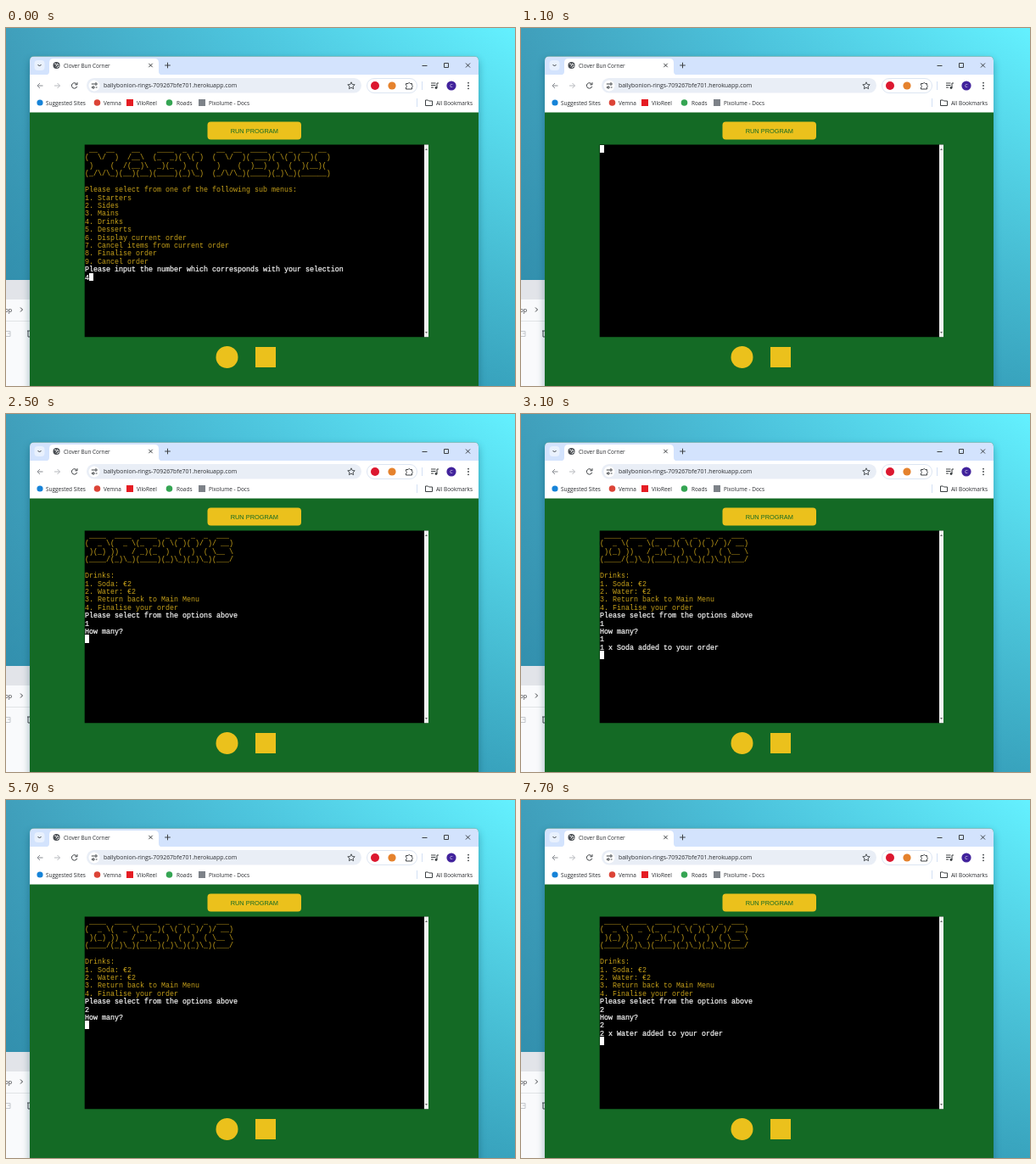
An HTML page for the animation above (8000 ms loop, 600 px wide and 422 px high).

```html
<!DOCTYPE html>
<html lang="en">
<head>
<meta charset="utf-8">
<title>Terminal order</title>
<style>
html, body { margin: 0; width: 100%; height: 100%; overflow: hidden; }
#stage { position: relative; width: 600px; height: 422px; overflow: hidden; background: #3fa9c8; }
svg { position: absolute; inset: 0; }
svg text { font-family: "Open Sans", "Noto Sans", sans-serif; fill: #2a2c30; }
.marks text { font-size: 6.45px; }
.line { fill: none; stroke: #3c4043; stroke-width: 1; }
#term {
  position: absolute; left: 93px; top: 138px; width: 400px; height: 226px; margin: 0;
  box-sizing: border-box; padding-top: 2px; overflow: hidden; background: #000; color: #c8a21a;
  font: 8.333px/9.42px "Liberation Mono", monospace; white-space: pre;
}
#term b { color: #fff; font-weight: normal; -webkit-text-stroke: .2px #fff; }
#term i {
  display: inline-block; position: relative; top: -2px; width: 5px; height: 9.42px;
  background: #fff; vertical-align: top;
}
</style>
</head>
<body>
<div id="stage">
<svg width="600" height="422" viewBox="0 0 600 422">
  <defs>
    <linearGradient id="sky">
      <stop offset="0" stop-color="#409fbb"/>
      <stop offset=".45" stop-color="#4dc4dd"/>
      <stop offset="1" stop-color="#64f1ff"/>
    </linearGradient>
    <linearGradient id="shade" x2="0" y2="1">
      <stop offset="0" stop-color="#247f9f" stop-opacity="0"/>
      <stop offset="1" stop-color="#247f9f" stop-opacity=".68"/>
    </linearGradient>
    <filter id="soft" x="-10%" y="-10%" width="120%" height="120%"><feGaussianBlur stdDeviation="5"/></filter>
  </defs>
  <rect width="600" height="422" fill="url(#sky)"/>
  <rect width="600" height="422" fill="url(#shade)"/>

  <!-- window behind -->
  <path d="M0 297H40V422H0z" fill="#f9fafc"/>
  <path d="M0 297H40V320H0z" fill="#e2e4e9"/>
  <path d="M0 345.5H40" stroke="#e1e3e6"/>
  <text x="-1.5" y="334.5" font-size="7">op</text>
  <path class="line" d="M17 329.5l2.5 2.5-2.5 2.5"/>
  <path class="line" d="M-1 357.5H5V363.5H-1M2 360H5" style="stroke:#c3c7cc"/>
  <path class="line" d="M25 357H31M26 357V364H31"/>

  <!-- browser frame -->
  <rect x="28" y="37" width="529" height="400" rx="5" fill="#003a50" opacity=".38" filter="url(#soft)"/>
  <path d="M28 422V38.5q0-5 5-5H552q5 0 5 5V422z" fill="#146a25"/>
  <path d="M28 56V38.5q0-5 5-5H552q5 0 5 5V56z" fill="#d3e3fd"/>
  <path d="M28 55H557V99.5H28z" fill="#fff"/>
  <path d="M47 55.2q4 0 4-4V41q0-5 5-5H175q5 0 5 5V51.2q0 4 4 4z" fill="#fff"/>
  <rect x="33.5" y="38" width="12" height="12" rx="4" fill="#e9f1fe"/>
  <path class="line" d="M37.5 43l2 2 2-2"/>
  <circle cx="59.5" cy="44" r="4" fill="#474b50"/>
  <path d="M57 42l2 .5 1 1.5-1.5 1M61 41.5l-.5 1.5 2 1M60 47l1-1.5 1.5 0" fill="none" stroke="#fff" stroke-width=".9"/>
  <text x="68" y="46.5" font-size="6.4">Clover Bun Corner</text>
  <path class="line" d="M168.3 41.8l4.4 4.4m0-4.4l-4.4 4.4M187.2 44H193.8M190.5 40.7V47.3"/>
  <path class="line" d="M490.5 44.5H496.5M516.5 41.5H521.5V46.5H516.5zM542 41.5l5 5m0-5l-5 5"/>

  <!-- toolbar -->
  <path class="line" d="M43.5 68H37M40 65l-3 3 3 3" style="stroke:#888c91"/>
  <path class="line" d="M57 68H63.5M60.5 65l3 3-3 3" style="stroke:#b6b9bd"/>
  <path class="line" d="M83.3 66.2a3.2 3.2 0 1 0 .4 2.6M84 64.2V66.8H81.4"/>
  <rect x="95" y="59" width="324" height="17.5" rx="8.7" fill="#e9eef6"/>
  <circle cx="104" cy="68" r="6.5" fill="#fff"/>
  <path class="line" d="M100.8 66H104M105.8 70H107.5M100.8 70H102.2"/>
  <circle class="line" cx="106" cy="66" r="1.2"/>
  <circle class="line" cx="103" cy="70" r="1.2"/>
  <text x="115" y="70.4" font-size="6.93">ballybonion-rings-709267bfe701.herokuapp.com</text>
  <path class="line" d="M407 63.8l1.2 2.7 3 .3-2.2 2 .6 2.9-2.6-1.5-2.6 1.5.6-2.9-2.2-2 3-.3z" style="stroke-width:.9"/>
  <rect x="425.5" y="59.5" width="59" height="17" rx="8.5" fill="#fff" stroke="#dce5f2"/>
  <circle cx="435" cy="68" r="5" fill="#dc1830"/>
  <circle cx="455" cy="68" r="4.6" fill="#e5822d"/>
  <path class="line" d="M471.5 65.5H474a1.4 1.4 0 0 1 2.6 0H478.5V67.5a1.3 1.3 0 0 1 0 2.4V72H471.5V70a1.4 1.4 0 0 0 0-2.6z"/>
  <path d="M490.5 63V73" stroke="#d3e0f4"/>
  <path class="line" d="M501 65H506.5M501 67.5H506.5M501 70H504M508 70.5V65H510"/>
  <circle cx="507" cy="70.5" r="1.4" fill="#3c4043"/>
  <circle cx="525" cy="68" r="5.6" fill="#42239c"/>
  <text x="525" y="70" font-size="5.5" text-anchor="middle" style="fill:#fff">C</text>
  <g fill="#3c4043"><circle cx="545" cy="64.7" r=".9"/><circle cx="545" cy="68" r=".9"/><circle cx="545" cy="71.3" r=".9"/></g>

  <!-- bookmarks -->
  <g class="marks">
    <circle cx="40" cy="88" r="3.6" fill="#1683d8"/><text x="47" y="90.5">Suggested Sites</text>
    <circle cx="107.5" cy="88" r="3.8" fill="#dc4437"/><text x="115" y="90.5">Vemna</text>
    <rect x="142" y="84" width="8" height="8" fill="#e51c23"/><text x="154" y="90.5">ViloReel</text>
    <circle cx="192.5" cy="88" r="3.8" fill="#35a553"/><text x="201" y="90.5">Roads</text>
    <rect x="227" y="84" width="8" height="8" fill="#7d8288"/><text x="239" y="90.5">Pixolume - Docs</text>
    <path d="M484.5 83V93" stroke="#d3e0f4"/>
    <path class="line" d="M494.5 85H497.5L498.5 86H502.5V91.5H494.5z"/><text x="507" y="90.5">All Bookmarks</text>
  </g>

  <!-- page -->
  <rect x="237.5" y="110.5" width="110.5" height="21" rx="4" fill="#ebc11c"/>
  <text x="292.8" y="124" font-size="7.4" text-anchor="middle" style="font-family:'Liberation Sans',sans-serif;fill:#146a25">RUN PROGRAM</text>
  <path d="M92.7 137.6H498V364.2H92.7z"/>
  <path d="M493 137.6H498V364.2H493z" fill="#f1f1f1"/>
  <path d="M494 144l1.5-2 1.5 2zM494 358l1.5 2 1.5-2z" fill="#666"/>
  <circle cx="260.5" cy="388" r="13" fill="#ebc11c"/>
  <rect x="294" y="376" width="24" height="24" fill="#ebc11c"/>
</svg>
<pre id="term"></pre>
</div>
<script>
const LOOP = 8000;
const CURSOR = '<i></i>';
const white = s => `<b>${s}</b>`;

const mainMenu = String.raw` __  __    __    ____  _  _    __  __  ____  _  _  __  __
(  \/  )  /__\  (_  _)( \( )  (  \/  )( ___)( \( )(  )(  )
 )    (  /(__)\  _)(_  )  (    )    (  )__)  )  (  )(__)(
(_/\/\_)(__)(__)(____)(_)\_)  (_/\/\_)(____)(_)\_)(______)

Please select from one of the following sub menus:
1. Starters
2. Sides
3. Mains
4. Drinks
5. Desserts
6. Display current order
7. Cancel items from current order
8. Finalise order
9. Cancel order
` + white('Please input the number which corresponds with your selection\n');

const drinksMenu = String.raw` ____  ____  ____  _  _  _  _  ___
(  _ \(  _ \(_  _)( \( )( )/ )/ __)
 )(_) ))   / _)(_  )  (  )  ( \__ \
(____/(_)\_)(____)(_)\_)(_)\_)(___/

Drinks:
1. Soda: €2
2. Water: €2
3. Return back to Main Menu
4. Finalise your order
` + white('Please select from the options above\n');

const drinks = typed => drinksMenu + white(typed) + CURSOR;

// [start in ms, terminal content]
const screens = [
  [0, mainMenu + white('4') + CURSOR],
  [1100, CURSOR],
  [1200, drinks('')],
  [2000, drinks('1')],
  [2500, drinks('1\nHow many?\n')],
  [2700, drinks('1\nHow many?\n1')],
  [2900, drinks('1\nHow many?\n1\n1 x Soda added to your order\n')],
  [5700, drinks('2\nHow many?\n')],
  [6000, drinks('2\nHow many?\n2')],
  [7700, drinks('2\nHow many?\n2\n2 x Water added to your order\n')]
];

const term = document.getElementById('term');
const start = performance.now();
let shown = -1;

function draw() {
  const t = (performance.now() - start) % LOOP;
  const now = screens.findLastIndex(([from]) => t >= from);
  if (now !== shown) term.innerHTML = screens[shown = now][1];
  requestAnimationFrame(draw);
}
draw();
</script>
</body>
</html>
```
